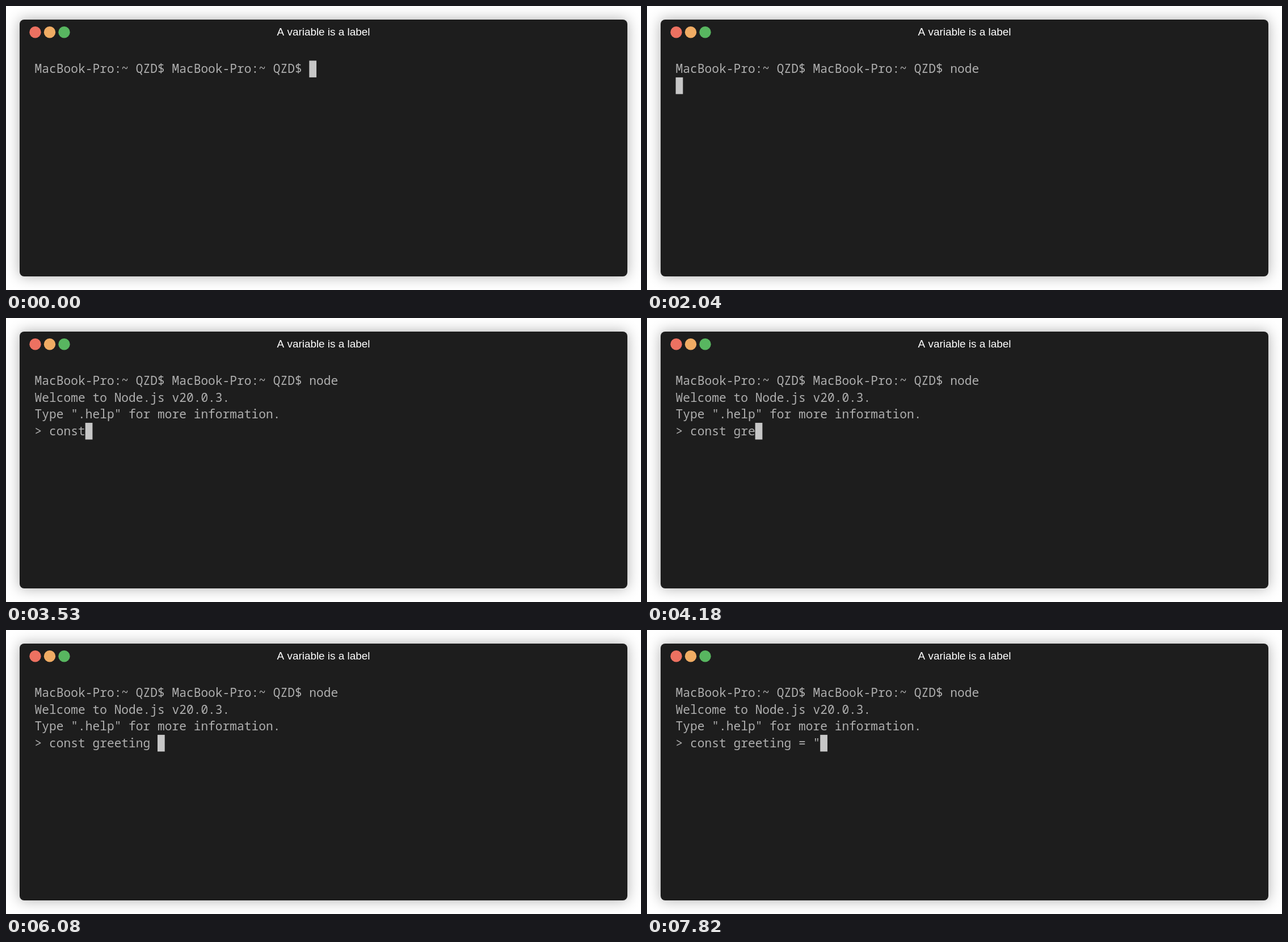
These frames come from a looping animation (1119 px wide and 501 px high, 8 s). An HTML page with a canvas:

```html
<!DOCTYPE html>
<html lang="en">
<head>
<meta charset="utf-8">
<title>A variable is a label</title>
<style>
html, body { margin: 0; width: 100%; height: 100%; overflow: hidden; background: #fff; }
canvas { display: block; }
</style>
</head>
<body>
<canvas id="stage" width="1119" height="501"></canvas>
<script>
const ctx = document.getElementById('stage').getContext('2d');
const LOOP = 8000;
const LEFT = 50.6, TOP = 96.4, CELL = 12.73, ROW = 29.5;
const PROMPT = 'MacBook-Pro:~ QZD$ ';

// Output appears at once; keys are spread evenly from start to end.
const script = [
  { start: 0, out: PROMPT + PROMPT },
  { start: 1320, end: 1550, keys: 'node' },
  { start: 2040, out: '\n' },
  { start: 2210, out: 'Welcome to Node.js v20.0.3.\nType ".help" for more information.\n' },
  { start: 2230, out: '> ' },
  { start: 3230, end: 3530, keys: 'const' },
  { start: 3880, out: ' ' },
  { start: 4080, end: 4180, keys: 'gre' },
  { start: 4360, end: 4710, keys: 'eting' },
  { start: 6080, end: 6300, keys: ' = ' },
  { start: 7820, out: '"' }
];

function screenText(t) {
  let text = '';
  for (const { start, end, out, keys } of script) {
    if (t < start) break;
    if (out) {
      text += out;
    } else {
      const step = (end - start) / (keys.length - 1);
      text += keys.slice(0, Math.floor((t - start) / step + 1e-6) + 1);
    }
  }
  return text;
}

function drawWindow() {
  ctx.fillStyle = '#fff';
  ctx.fillRect(0, 0, 1119, 501);

  ctx.save();
  ctx.shadowColor = 'rgba(0, 0, 0, 0.32)';
  ctx.shadowBlur = 24;
  ctx.fillStyle = '#1d1d1d';
  ctx.beginPath();
  ctx.roundRect(24, 24, 1071, 453, 8);
  ctx.fill();
  ctx.restore();

  ['#ed7161', '#f0ac64', '#58b660'].forEach((color, i) => {
    ctx.fillStyle = color;
    ctx.beginPath();
    ctx.arc(51.5 + i * 25.5, 46.2, 10.2, 0, Math.PI * 2);
    ctx.fill();
  });

  ctx.fillStyle = '#fff';
  ctx.font = '18.9px "Liberation Sans", Arial, sans-serif';
  ctx.textAlign = 'center';
  ctx.fillText('A variable is a label', 559.5, 51.5);
}

function drawTerminal(text) {
  const lines = text.split('\n');
  ctx.font = '21.2px "Noto Sans Mono", "DejaVu Sans Mono", monospace';
  ctx.textAlign = 'left';
  ctx.fillStyle = '#afafaf';
  lines.forEach((line, row) => {
    const y = Math.round(TOP + row * ROW + 21.6);
    [...line].forEach((ch, col) => ctx.fillText(ch, LEFT + col * CELL, y));
  });

  const row = lines.length - 1;
  ctx.fillStyle = '#c7c7c7';
  ctx.fillRect(LEFT + lines[row].length * CELL, TOP + row * ROW, CELL, ROW);
}

const began = performance.now();

function draw() {
  const t = (performance.now() - began) % LOOP;
  drawWindow();
  drawTerminal(screenText(t));
  requestAnimationFrame(draw);
}

draw();
</script>
</body>
</html>
```
